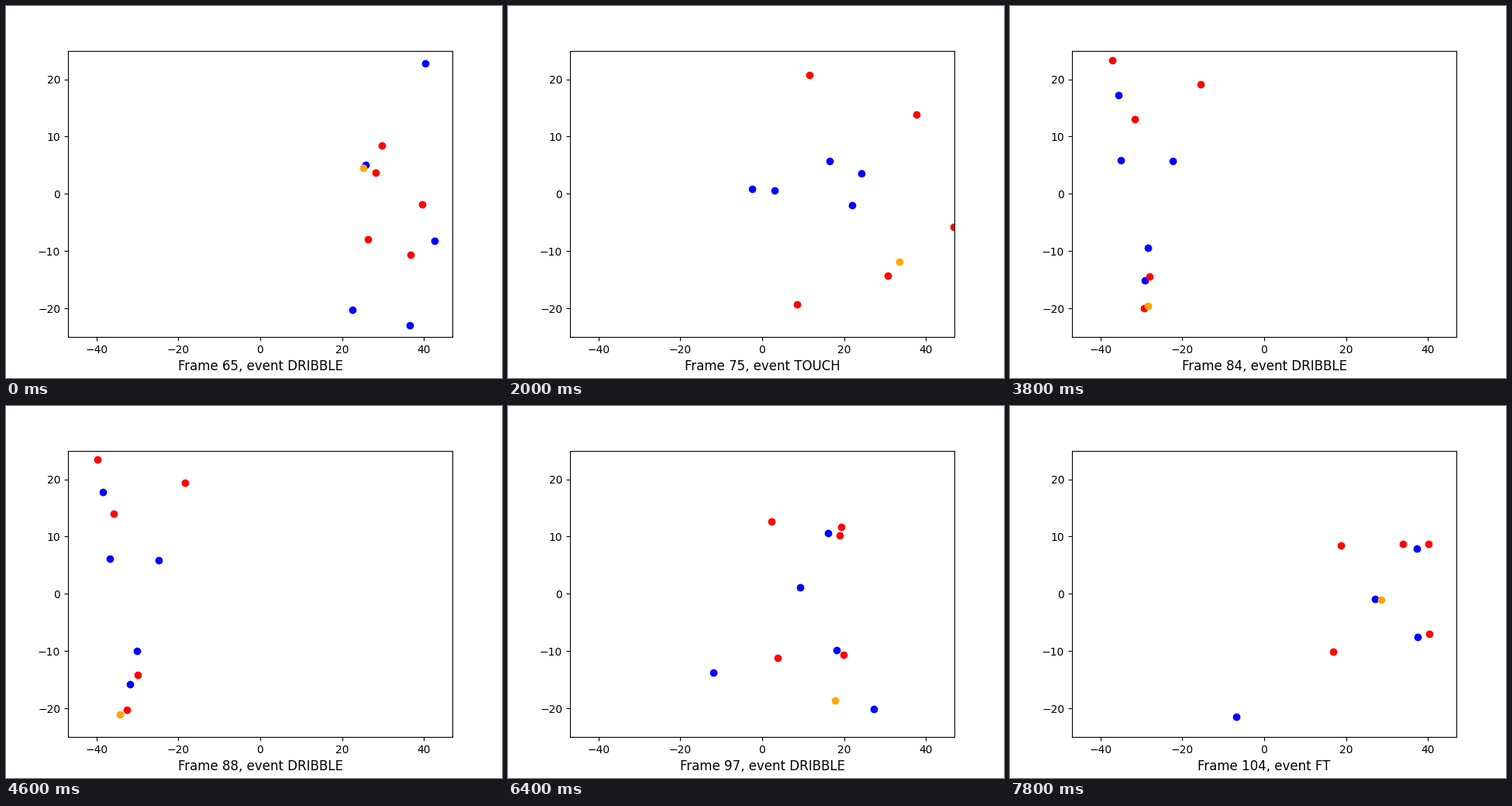
A matplotlib script for the animation above (8000 ms loop, 640 by 480 pixels).

```python
import numpy as np
import matplotlib.pyplot as plt
from matplotlib.animation import FuncAnimation

STEPS, INTERVAL, FIRST = 40, 200, 65
HALF_LENGTH, HALF_WIDTH = 47, 25

# Pace of play: right-hand set, turnover, left-hand set, free throw.
PACE_STEPS = [0, 4, 10, 15, 23, 30, 32, 39]
PACE = [0, 0.4, 1, 1.9, 2, 2.14, 2.72, 3]

# Each player runs through four spots, in pixels.
BLUE = [
    [(541, 74), (415, 200), (125, 111), (525, 184)],
    [(464, 205), (315, 236), (134, 197), (471, 249)],
    [(553, 303), (456, 216), (197, 199), (292, 401)],
    [(447, 392), (344, 238), (169, 316), (590, 420)],
    [(521, 412), (444, 257), (160, 359), (526, 298)],
]
RED = [
    [(485, 180), (527, 140), (231, 99), (507, 178)],
    [(477, 215), (389, 89), (118, 69), (427, 180)],
    [(537, 256), (575, 285), (139, 139), (540, 178)],
    [(467, 301), (373, 385), (170, 347), (417, 317)],
    [(522, 321), (490, 348), (156, 392), (541, 294)],
]
BALL_STEPS = [0, 4, 10, 15, 23, 26, 32, 39]
BALL = [(461, 209), (435, 306), (505, 330), (208, 376),
        (147, 398), (105, 243), (422, 380), (479, 250)]

fig = plt.figure(figsize=(6.4, 4.8), dpi=100, facecolor="white")
ax = fig.add_subplot()
ax.set_xlim(-HALF_LENGTH, HALF_LENGTH)
ax.set_ylim(-HALF_WIDTH, HALF_WIDTH)
ax.set_xticks(range(-40, 41, 20))
ax.set_yticks(range(-20, 21, 10))


def to_court(points):
    """Pixels, y down, to court coordinates."""
    px = np.asarray(points, float)
    x = (px[..., 0] - 328) * 2 * HALF_LENGTH / 496
    y = (242.4 - px[..., 1]) * 2 * HALF_WIDTH / 369.6
    return np.stack([x, y], axis=-1)


def along(t, times, path):
    return [np.interp(t, times, path[:, i]) for i in (0, 1)]


def make_dots(color):
    return ax.plot([], [], "o", color=color)[0]


def event(step):
    """A pass and a touch in every eight steps of dribbling."""
    if step >= STEPS - 2:
        return "FT"
    return {1: "PASS", 2: "TOUCH"}.get(step % 8, "DRIBBLE")


teams = [(make_dots("blue"), to_court(BLUE)), (make_dots("red"), to_court(RED))]
ball, ball_path = make_dots("orange"), to_court(BALL)
label = ax.set_xlabel("", fontsize=12)


def update(step):
    pace = np.interp(step, PACE_STEPS, PACE)
    for dots, paths in teams:
        dots.set_data(*zip(*(along(pace, range(4), p) for p in paths)))
    x, y = along(step, BALL_STEPS, ball_path)
    ball.set_data([x], [y])
    label.set_text(f"Frame {FIRST + step}, event {event(step)}")
    return [dots for dots, _ in teams] + [ball, label]


anim = FuncAnimation(fig, update, frames=STEPS, interval=INTERVAL,
                     repeat=True, repeat_delay=0, blit=False)
plt.show()
```
